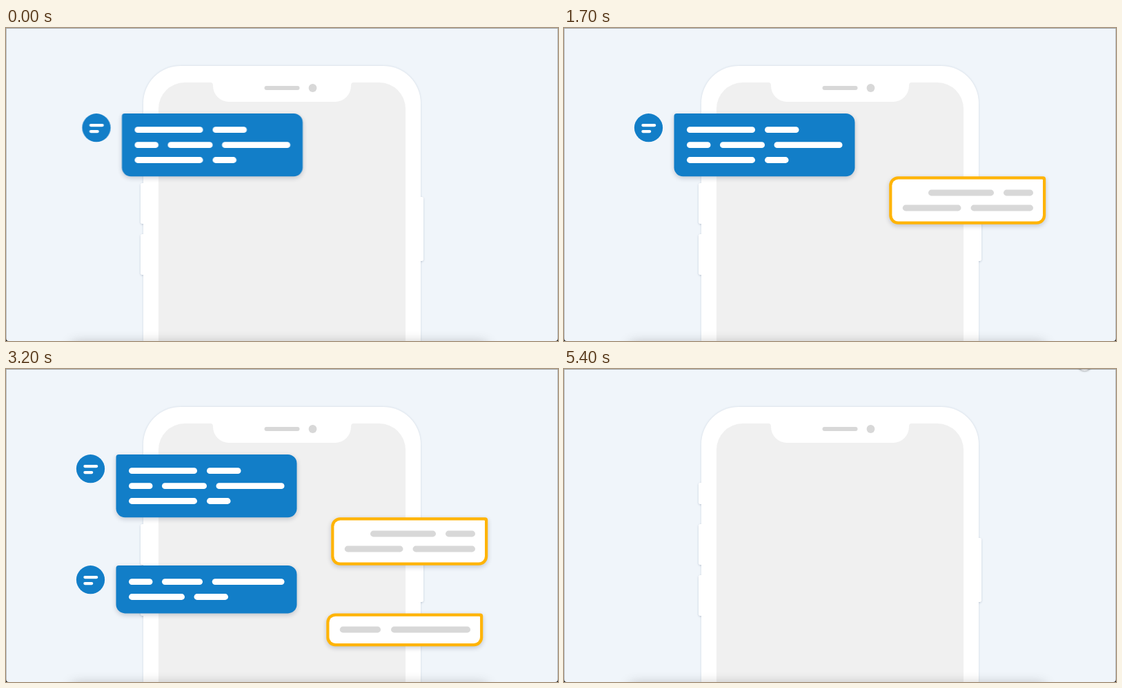
Recreate the animation shown at these times as an HTML page with a canvas. Size 800 px wide and 454 px high, loop 5.5 s.

```html
<!DOCTYPE html>
<html lang="en">
<head>
<meta charset="utf-8">
<title>Chat on a phone</title>
<style>
  html, body { margin: 0; width: 100%; height: 100%; overflow: hidden; background: #f0f5fa; }
  canvas { display: block; width: 800px; height: 454px; }
</style>
</head>
<body>
<canvas id="stage" width="800" height="454"></canvas>
<script>
const W = 800, H = 454, LOOP = 5500;
const BLUE = '#127ec8', AMBER = '#ffb406', GREY = '#d8d8d8';
const stage = document.getElementById('stage').getContext('2d');

function makeLayer(paint) {
  const canvas = document.createElement('canvas');
  canvas.width = W;
  canvas.height = H;
  paint(canvas.getContext('2d'));
  return canvas;
}

function box(c, x, y, w, h, r, color) {
  c.fillStyle = color;
  c.beginPath();
  c.roundRect(x, y, w, h, r);
  c.fill();
}

function disc(c, x, y, r, color) {
  c.fillStyle = color;
  c.beginPath();
  c.arc(x, y, r, 0, Math.PI * 2);
  c.fill();
}

function shadow(c, color, blur, dy) {
  c.shadowColor = color;
  c.shadowBlur = blur;
  c.shadowOffsetY = dy;
}

const noShadow = c => shadow(c, 'transparent', 0, 0);

// Text stand-ins: each row is [centre y, start, end, start, end, ...]
function bars(c, rows, color) {
  for (const [y, ...ends] of rows)
    for (let i = 0; i < ends.length; i += 2)
      box(c, ends[i], y - 4.4, ends[i + 1] - ends[i], 8.8, 4.4, color);
}

function paintButtons(c) {
  for (const [x, y, h] of [[195, 165, 31], [195, 225, 59], [195, 299, 59], [595, 245, 93]])
    box(c, x, y, 10, h, 3, '#fff');
}

function paintPhone(c) {
  shadow(c, 'rgba(70,95,125,.28)', 3, 1);
  paintButtons(c);
  shadow(c, 'rgba(70,95,125,.2)', 3, 0);
  box(c, 199, 55, 402, 450, 54, '#fff');
  noShadow(c);
  paintButtons(c);

  c.fillStyle = '#f0f0f0';
  c.beginPath();
  c.moveTo(221, H);
  c.lineTo(221, 117);
  c.arcTo(221, 79, 259, 79, 38);
  c.lineTo(296, 79);
  c.arcTo(300, 79, 300, 83, 4);
  c.arcTo(300, 107, 324, 107, 23);
  c.arcTo(500, 107, 500, 83, 23);
  c.arcTo(500, 79, 504, 79, 4);
  c.arcTo(579, 79, 579, 117, 38);
  c.lineTo(579, H);
  c.fill();

  box(c, 374.5, 84, 51, 6, 3, GREY);
  disc(c, 444.5, 87, 5.9, GREY);
}

function paintBackdrop(c) {
  c.fillStyle = '#f0f5fa';
  c.fillRect(0, 0, W, H);
  paintPhone(c);
}

function paintFrame(c) {
  shadow(c, 'rgba(0,0,0,.3)', 18, 0);
  c.fillStyle = '#000';
  c.fillRect(96, 458, 600, 40);
  noShadow(c);
  c.fillStyle = 'rgba(0,0,0,.32)';
  c.fillRect(0, 0, W, 1);
  c.fillStyle = 'rgba(0,0,0,.22)';
  c.fillRect(0, 1, 1, H);
  c.fillRect(W - 1, 1, 1, H);
  c.fillStyle = '#111';
  c.beginPath();
  c.rect(0, H - 4, W, 4);
  c.roundRect(0, H - 12, W, 12, [0, 0, 4, 4]);
  c.clip('evenodd');
  c.fillRect(0, H - 4, 4, 4);
  c.fillRect(W - 4, H - 4, 4, 4);
}

const bubbleShadow = c => shadow(c, 'rgba(0,20,50,.2)', 7, 2.5);

function paintIncoming(c, { y, h, rows }) {
  disc(c, 122.5, y + 20.7, 20.6, BLUE);
  box(c, 112.3, y + 15, 21, 4.2, 2.1, '#fff');
  box(c, 112.3, y + 24, 14, 4.2, 2.1, '#fff');
  bubbleShadow(c);
  box(c, 159.5, y, 262, h, [4, 13, 13, 13], BLUE);
  noShadow(c);
  bars(c, rows, '#fff');
}

function paintOutgoing(c, { y, h, rows }) {
  bubbleShadow(c);
  box(c, 471.2, y, 227, h, [13, 4, 13, 13], AMBER);
  noShadow(c);
  box(c, 475.4, y + 4.2, 218.6, h - 8.4, [9, 1, 9, 9], '#fff');
  bars(c, rows, GREY);
}

// side: -1 enters from the left, 1 from the right
const bubbles = [
  { side: -1, start: -425, y: 124, h: 91.2, rows: [
    [147.7, 178, 277, 291, 340.5],
    [169.7, 178, 212.5, 226, 291, 304.5, 403.5],
    [191.5, 178, 277, 291, 325.5]] },
  { side: 1, start: 625, y: 215.3, h: 69.5, rows: [
    [239, 528, 623, 637, 680],
    [261, 490.7, 575.5, 589.5, 680]] },
  { side: -1, start: 1675, y: 285, h: 69.4, rows: [
    [308.6, 178, 212.5, 226, 285, 298.7, 403.5],
    [330.5, 178, 259, 272.5, 322]] },
  { side: 1, start: 2725, y: 354.5, h: 47.7, rows: [
    [378, 490.7, 550, 565, 680]] }
];
for (const b of bubbles)
  b.art = makeLayer(c => (b.side < 0 ? paintIncoming : paintOutgoing)(c, b));

const backdrop = makeLayer(paintBackdrop);
const frame = makeLayer(paintFrame);

const clamp = v => Math.min(1, Math.max(0, v));
const RISE = 350, SETTLE = 500, FADE = 268, EXIT = 4040, EXIT_TIME = 497;

// Fly in past the resting place, ease back, later fly out the same side.
function pose(b, t) {
  const [reach, over] = b.side < 0 ? [625, 9] : [480, 8.2];
  const age = t - b.start;
  const out = clamp((t - EXIT) / EXIT_TIME);
  let x;
  if (age < RISE) {
    const left = 1 - clamp(age / RISE);
    x = (reach + over) * left * left - over;
  } else {
    const p = clamp((age - RISE) / SETTLE);
    x = -over * (1 + Math.cos(Math.PI * p)) / 2;
  }
  x += reach * out * out;
  return { x: b.side * x, alpha: clamp(age / FADE) * (1 - out) };
}

// A round pointer peeks over the top edge now and then.
function drawPointer(c, t) {
  const peek = t >= 5400 ? 0 : t >= 5100 && t < 5200 ? 1 : t >= 4800 && t < 4900 ? 1.5 : -1;
  if (peek < 0) return;
  shadow(c, 'rgba(0,0,0,.45)', 3, 0.5);
  disc(c, 754.5, -8 + peek, 10.5, '#f6f7f9');
  noShadow(c);
}

function draw(t) {
  stage.drawImage(backdrop, 0, 0);
  for (const b of bubbles) {
    const { x, alpha } = pose(b, t);
    if (alpha <= 0) continue;
    stage.globalAlpha = alpha;
    stage.drawImage(b.art, x, 0);
  }
  stage.globalAlpha = 1;
  drawPointer(stage, t);
  stage.drawImage(frame, 0, 0);
}

const begin = performance.now();
function tick() {
  draw((performance.now() - begin) % LOOP);
  requestAnimationFrame(tick);
}
tick();
</script>
</body>
</html>
```
